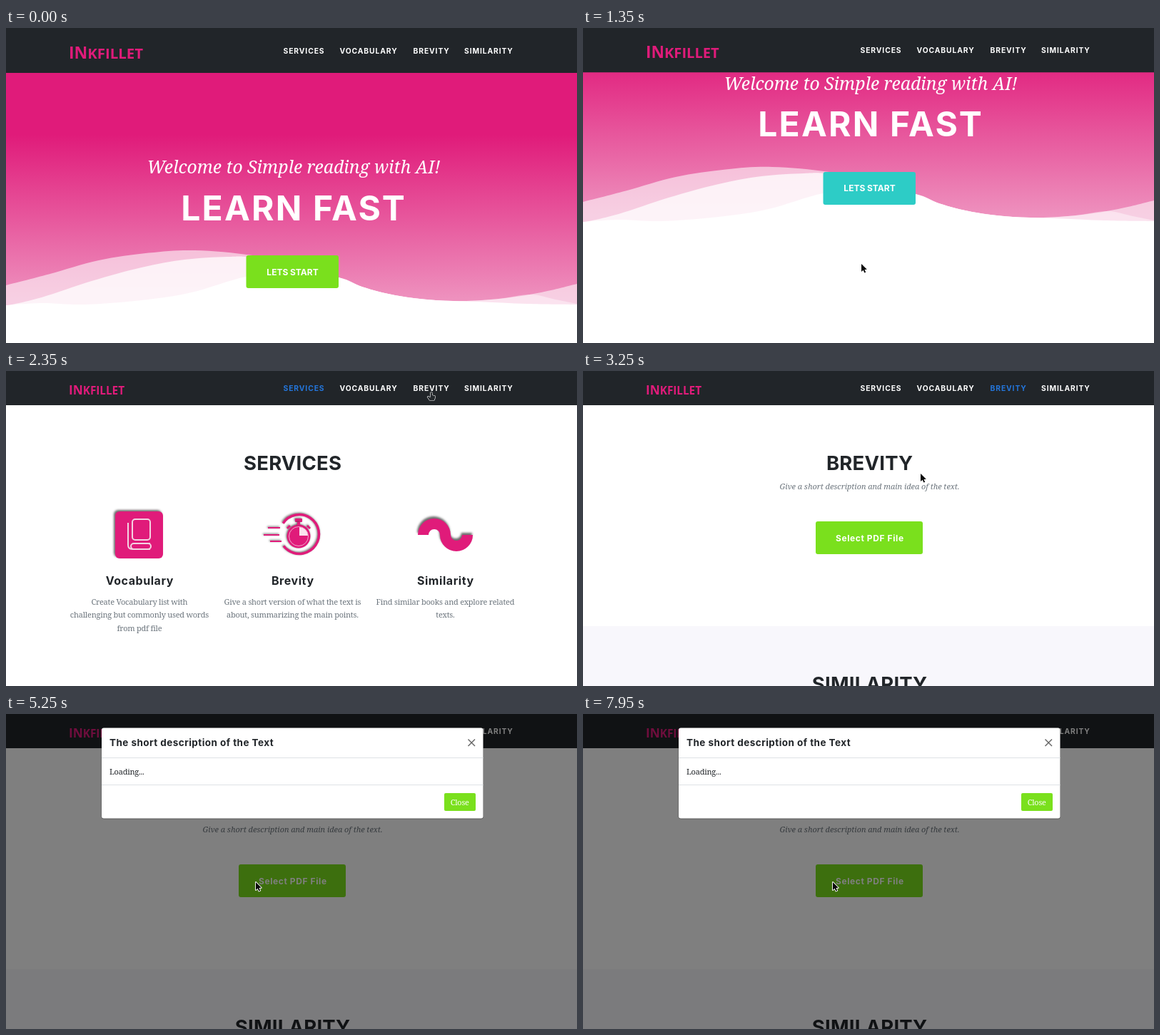
Animation of 800 by 442 pixels, one loop 8 s. Source, as an HTML page with a canvas:

```html
<!DOCTYPE html>
<html lang="en">
<head>
<meta charset="utf-8">
<title>Simple reading</title>
<style>
html, body { margin: 0; width: 100%; height: 100%; overflow: hidden; background: #fff; }
canvas { display: block; width: 100vw; height: 100vh; }
</style>
</head>
<body>
<canvas id="stage"></canvas>
<script>
const W = 800, H = 442, LOOP = 8000, STEP = 50;
const canvas = document.getElementById('stage');
const ratio = window.devicePixelRatio || 1;
canvas.width = W * ratio;
canvas.height = H * ratio;
const c = canvas.getContext('2d');

const PINK = '#e01b7a', GREEN = [122, 224, 29], CYAN = [30, 200, 232];
const DARK = '#212529', MUTED = '#6c757d', BLUE = [36, 118, 220], WHITE = [255, 255, 255];
const SANS = 'Inter, "Open Sans", sans-serif';
const SERIF = '"Noto Serif", serif';
const UI = '"Noto Sans", "Open Sans", sans-serif';

// Page layout: tops of the sections in page coordinates
const SERVICES = 518, VOCABULARY = 933, BREVITY = 1243, SIMILARITY = 1553, NAV_SMALL = 48;
const DIALOG_OPEN = 3800, DIALOG_CLOSE = 4800, MODAL_AT = 4850;

const clamp = v => Math.max(0, Math.min(1, v));
const span = (t, a, b) => clamp((t - a) / (b - a));
const lerp = (a, b, k) => a + (b - a) * k;
const easeInOut = k => k < .5 ? 2 * k * k : 1 - 2 * (1 - k) * (1 - k);
const easeOut = k => 1 - (1 - k) * (1 - k);
const mix = (a, b, k) => `rgb(${a.map((v, i) => Math.round(lerp(v, b[i], k))).join(',')})`;
// On between a and b, with a short fade at both ends
const pulse = (t, a, b, fade = 150) => span(t, a, a + fade) * (1 - span(t, b, b + fade));

function text(str, x, y, font, color, align = 'left', spacing = 0) {
  c.font = font;
  c.fillStyle = color;
  c.textAlign = align;
  c.textBaseline = 'alphabetic';
  c.letterSpacing = spacing + 'px';
  c.fillText(str, align === 'center' ? x + spacing / 2 : x, y);
}

function rect(x, y, w, h, color, r = 0) {
  c.fillStyle = color;
  c.beginPath();
  c.roundRect(x, y, w, h, r);
  c.fill();
}

function disc(x, y, r, color) {
  c.fillStyle = color;
  c.beginPath();
  c.arc(x, y, r, 0, 7);
  c.fill();
}

function line(points, color, width = 1) {
  c.strokeStyle = color;
  c.lineWidth = width;
  c.beginPath();
  points.forEach(([x, y]) => c.lineTo(x, y));
  c.stroke();
}

function shape(points, color) {
  c.fillStyle = color;
  c.beginPath();
  points.forEach(([x, y]) => c.lineTo(x, y));
  c.fill();
}

// Smooth curve through the points, filled downwards
function wave(points, bottom, color) {
  const at = i => points[Math.max(0, Math.min(points.length - 1, i))];
  c.fillStyle = color;
  c.beginPath();
  c.moveTo(...points[0]);
  for (let i = 0; i < points.length - 1; i++) {
    const [p, a, b, n] = [at(i - 1), at(i), at(i + 1), at(i + 2)];
    c.bezierCurveTo(a[0] + (b[0] - p[0]) / 6, a[1] + (b[1] - p[1]) / 6,
      b[0] - (n[0] - a[0]) / 6, b[1] - (n[1] - a[1]) / 6, b[0], b[1]);
  }
  c.lineTo(W, bottom);
  c.lineTo(0, bottom);
  c.fill();
}

const FALL = [[466, 350], [500, 363.5], [545, 375], [595, 381.5]];
const BACK_WAVE = [[0, 361], [60, 345.5], [130, 326], [200, 315.5], [265, 312], [345, 319], [420, 334],
  ...FALL, [645, 383], [700, 379], [750, 371], [800, 359]];
const MID_WAVE = [[0, 390], [50, 378], [120, 355], [190, 336], [250, 325], [310, 321], [345, 322], [420, 336],
  ...FALL, [660, 385], [800, 390]];
const TAIL_WAVE = [[600, 382], [645, 383], [690, 380], [735, 374], [770, 381], [800, 387]];
const FRONT_WAVE = [[0, 389], [50, 386], [110, 388], [190, 382], [260, 371], [336, 349], [400, 343],
  ...FALL, [660, 384], [730, 387], [800, 388]];

function hero(hover) {
  const g = c.createLinearGradient(0, 150, 0, 380);
  g.addColorStop(0, PINK);
  g.addColorStop(1, '#ee91be');
  rect(0, 0, W, 400, g);
  wave(BACK_WAVE, 401, 'rgba(255,255,255,.57)');
  wave(MID_WAVE, 401, 'rgba(255,255,255,.76)');
  wave(TAIL_WAVE, 401, 'rgba(255,255,255,.4)');
  wave(FRONT_WAVE, 401, '#fff');
  text('Welcome to Simple reading with AI!', 403, 204, `italic 24.7px ${SERIF}`, '#fff', 'center');
  text('LEARN FAST', 402, 269.5, `700 48px ${SANS}`, '#fff', 'center', 2.2);
  rect(336.5, 319, 129.5, 46, mix(GREEN, CYAN, hover), 3);
  text('LETS START', 401.5, 346.5, `700 12px ${SANS}`, '#fff', 'center');
}

function heading(str, top) {
  text(str, 401.5, top + 90.5, `700 27.5px ${SANS}`, DARK, 'center', .2);
}

function withShadow(dx, dy, draw) {
  c.save();
  c.shadowColor = 'rgba(60,60,60,.75)';
  c.shadowBlur = 3 * ratio;
  c.shadowOffsetX = dx * ratio;
  c.shadowOffsetY = dy * ratio;
  draw();
  c.restore();
}

function bookIcon(y) {
  withShadow(-2, -2, () => rect(153, y + 149, 67, 66, PINK, 6));
  c.strokeStyle = '#f3d3e2';
  c.lineWidth = 2;
  c.beginPath();
  c.roundRect(177, y + 160, 25, 29, 4);
  c.moveTo(171, y + 165);
  c.lineTo(171, y + 196);
  c.quadraticCurveTo(171, y + 202, 177, y + 202);
  c.lineTo(202, y + 202);
  c.moveTo(202, y + 194);
  c.lineTo(179, y + 194);
  c.arc(179, y + 198, 4, -Math.PI / 2, Math.PI / 2, true);
  c.lineTo(199, y + 202);
  c.arc(199, y + 198, 4, Math.PI / 2, -Math.PI / 2, true);
  c.stroke();
}

function watchIcon(y) {
  const cy = y + 182;
  withShadow(-1, -1, () => {
    c.strokeStyle = PINK;
    c.lineWidth = 3.5;
    c.beginPath();
    c.arc(411, cy - 1, 27.5, -2.55, 2.5);
    c.stroke();
    [[367, 384, -10], [361, 383, 0], [370, 386, 9]].forEach(([a, b, d]) =>
      line([[a, cy + d], [b, cy + d]], PINK, 2));
    disc(410, cy + 2, 16.5, PINK);
    rect(405, cy - 23, 10, 5, PINK, 1);
    rect(408, cy - 18, 4, 5, PINK);
    line([[422, cy - 13], [426, cy - 9]], PINK, 3);
    line([[398, cy - 13], [394, cy - 9]], PINK, 3);
  });
  c.fillStyle = '#fbe3ee';
  c.beginPath();
  c.moveTo(411, cy + 1);
  c.arc(411, cy + 1, 12, -Math.PI / 2, 0);
  c.fill();
  c.strokeStyle = '#f2a9cb';
  c.lineWidth = 1;
  c.beginPath();
  c.arc(410, cy + 2, 13.5, 0, 7);
  c.stroke();
}

function sineIcon(y) {
  withShadow(-1, -3, () => {
    c.strokeStyle = PINK;
    c.lineWidth = 15;
    c.beginPath();
    c.arc(600, y + 182, 15.5, Math.PI, 0);
    c.arc(631, y + 182, 15.5, Math.PI, 0, true);
    c.stroke();
  });
}

const CARDS = [
  [187, 'Vocabulary', ['Create Vocabulary list with', 'challenging but commonly used words', 'from pdf file']],
  [401.5, 'Brevity', ['Give a short version of what the text is', 'about, summarizing the main points.']],
  [615.5, 'Similarity', ['Find similar books and explore related', 'texts.']]
];

function services(y) {
  heading('SERVICES', y);
  bookIcon(y);
  watchIcon(y);
  sineIcon(y);
  for (const [x, title, rows] of CARDS) {
    text(title, x, y + 251.5, `700 16px ${SANS}`, DARK, 'center', .55);
    rows.forEach((row, i) =>
      text(row, x, y + 279.5 + i * 18.8, `11px ${SERIF}`, MUTED, 'center', -.25));
  }
}

function uploader(y, title, note, hover = 0) {
  heading(title, y);
  text(note, 401.5, y + 118, `italic 10.9px ${SERIF}`, MUTED, 'center');
  rect(326, y + 163, 150, 46, mix(GREEN, CYAN, hover), 3);
  text('Select PDF File', 401.5, y + 190.5, `700 12px ${SANS}`, '#fff', 'center', .6);
}

const LINKS = [['SERVICES', 388.5, SERVICES], ['VOCABULARY', 467.5, VOCABULARY],
  ['BREVITY', 570.5, BREVITY], ['SIMILARITY', 642, SIMILARITY]];

function navbar(shrink, scroll, brevityHover) {
  const h = lerp(63, NAV_SMALL, shrink);
  const size = lerp(1, .75, shrink);
  rect(0, 0, W, h, DARK);
  c.save();
  c.translate(88, lerp(42.5, 33, shrink));
  c.scale(size, size);
  text('IN', 0, 0, `700 23px "Open Sans", ${UI}`, PINK);
  text('KFILLET', 26.3, 0, `700 20.4px "Open Sans", ${UI}`, PINK);
  c.restore();
  LINKS.forEach(([label, x, top], i) => {
    const next = i < 3 ? LINKS[i + 1][2] : Infinity;
    const spy = scroll + 110;
    const active = spy >= top && spy < next;
    const k = active ? 1 : label === 'BREVITY' ? brevityHover : 0;
    text(label, x, h / 2 + 4, `700 10.3px ${SANS}`, mix(WHITE, BLUE, k), 'left', .9);
  });
}

function scrollAt(t) {
  const first = SERVICES - NAV_SMALL, second = BREVITY - NAV_SMALL;
  return t < 2620
    ? first * easeInOut(span(t, 1170, 1680))
    : lerp(first, second, easeInOut(span(t, 2630, 3150)));
}

function page(t) {
  const scroll = scrollAt(t);
  rect(0, 0, W, H, '#fff');
  c.save();
  c.translate(0, -scroll);
  hero(pulse(t, 720, 1325));
  services(SERVICES);
  rect(0, VOCABULARY, W, BREVITY - VOCABULARY, '#f8f7fc');
  uploader(VOCABULARY, 'VOCABULARY', 'Create a list of challenging but commonly used words.');
  uploader(BREVITY, 'BREVITY', 'Give a short description and main idea of the text.', pulse(t, 3460, 4000));
  rect(0, SIMILARITY, W, 310, '#f8f7fc');
  heading('SIMILARITY', SIMILARITY);
  c.restore();
  const k = span(t, 1310, 1610);
  navbar(k * k * (3 - 2 * k), scroll, pulse(t, 2350, 2950));
}

function modal(t) {
  const fade = span(t, MODAL_AT, MODAL_AT + 150);
  rect(0, 0, W, H, `rgba(0,0,0,${.5 * fade})`);
  c.save();
  c.globalAlpha = fade;
  c.translate(0, -33 * (1 - easeOut(span(t, MODAL_AT, MODAL_AT + 300))));
  rect(133.5, 19, 535.5, 128.5, 'rgba(0,0,0,.3)', 4);
  rect(134, 19.5, 534.5, 127, '#fff', 3);
  rect(134, 61, 534.5, 1, '#dee2e6');
  rect(134, 99, 534.5, 1, '#dee2e6');
  text('The short description of the Text', 145, 45, `700 13.5px ${SANS}`, DARK, 'left', .45);
  line([[647.5, 35.5], [657, 45]], '#666', 1.4);
  line([[657, 35.5], [647.5, 45]], '#666', 1.4);
  text('Loading...', 145, 85, `11px ${SERIF}`, DARK, 'left', -.25);
  rect(614, 111, 44, 25, `rgb(${GREEN})`, 2);
  text('Close', 635.8, 128, `10.8px ${SERIF}`, '#fff', 'center', -.2);
  c.restore();
}

function folder(x, y, color) {
  rect(x, y - 4, 5, 3, color, 1);
  rect(x, y - 3, 10, 7, color, 1);
}

function sheet(x, y) {
  rect(x, y - 5, 8, 10, '#eef0f4', 1);
  [-2, 0, 2].forEach(d => rect(x + 2, y + d, 4, .8, '#8b93a5'));
}

const PLACES = [['Recent', 37], ['Home', 58.5], ['Desktop', 80], ['Downloads', 101.5],
  ['git', 129], ['data', 150.5], ['Other Locations', 178]];
const FILES = [['venv', '', '', 'Tue'], ['app', '', '', '09:15'],
  ['README.md', '60 bytes', 'Text', 'Tue'], ['example.pdf', '377.4 kB', 'Document', 'Tue']];

function placeIcons(ink) {
  c.strokeStyle = ink;
  c.lineWidth = 1.3;
  c.beginPath();
  c.arc(8, 37.5, 4.3, 0, 7);
  c.stroke();
  line([[8, 38], [10, 36]], ink, 1.2);
  house(8, 58.5, ink);
  rect(3, 76, 10, 6, ink);
  rect(3, 83, 2, 2, ink);
  rect(11, 83, 2, 2, ink);
  rect(7, 96, 2, 5, ink);
  shape([[4, 100], [12, 100], [8, 104]], ink);
  rect(4, 105, 8, 1.4, ink);
  folder(3, 129.5, ink);
  folder(3, 151, ink);
  rect(3, 177.4, 10, 1.3, ink);
  rect(7.4, 173, 1.3, 10, ink);
}

function house(x, y, ink) {
  shape([[x - 5, y], [x, y - 5], [x + 5, y]], ink);
  rect(x - 3.5, y - 1, 2.5, 5, ink);
  rect(x + 1, y - 1, 2.5, 5, ink);
}

function dialog(t) {
  const font = `9.4px ${UI}`, bold = `700 9.3px ${UI}`, ink = '#e4e6eb';
  rect(0, 0, W, H, '#23252e');
  rect(0, 0, W, 25, '#20222b');
  rect(0, 0, W, 4, '#191b22');
  rect(0, 25, 20.5, H, '#191b20');
  disc(2, 15, 5.5, '#2777ff');
  line([[0, 13], [4, 17]], '#101624', 1.2);
  line([[4, 13], [0, 17]], '#101624', 1.2);
  disc(17, 15, 5.5, '#0e1015');
  disc(17, 15, 4.5, '#343742');
  text('File Upload', 411, 17.5, `700 7.6px ${UI}`, '#fff', 'center');
  PLACES.forEach(([name, y]) => text(name, 27, y + 3.5, font, ink));
  placeIcons('#c9ccd3');

  rect(114, 25, 1, H, '#17191f');
  rect(115, 25, 685, 28, '#272a34');
  rect(119, 29, 160.5, 19.5, '#15171d', 3);
  rect(120, 30, 158.5, 17.5, '#30333e', 2);
  rect(203, 30, 58, 17.5, '#1d1f27');
  [137, 174, 202, 261].forEach(x => rect(x, 30, 1, 17.5, '#15171d'));
  shape([[130, 35.5], [130, 42], [126, 38.8]], ink);
  shape([[269, 35.5], [269, 42], [273, 38.8]], '#8b8f99');
  house(148, 39, ink);
  text('ko', 156, 42, font, ink);
  text('git', 183, 42, font, ink);
  text('easylearn', 211, 42, font, ink);

  rect(115, 53, 685, 17, '#2e313c');
  rect(115, 53, 685, 1, '#191b22');
  rect(115, 69.5, 685, 1, '#191b22');
  [634, 682.5, 738].forEach(x => rect(x, 53, 1, 17, '#191b22'));
  [['Name', 119], ['Size', 638], ['Type', 687], ['Modified', 742]].forEach(([name, x]) =>
    text(name, x, 65, bold, '#fff'));
  shape([[786, 60], [793, 60], [789.5, 63.8]], ink);

  if (t >= 4350) rect(115, 120.5, 685, 17, '#2476ff');
  FILES.forEach(([name, size, type, date], i) => {
    const y = 78.7 + i * 16.9;
    if (i < 2) folder(121, y, '#2777ff'); else sheet(122, y - .5);
    text(name, 137, y + 3.4, font, ink);
    text(size, 677, y + 3.4, font, ink, 'right');
    text(type, 688, y + 3.4, font, ink);
    text(date, 744, y + 3.4, font, ink);
  });
}

// Pointer stops: time, x, y
const PATH = [[350, 806, 300], [800, 390, 331], [1720, 390, 331], [2330, 595, 30], [2800, 595, 30],
  [3150, 473, 144], [3250, 473, 144], [3520, 420, 237], [3860, 420, 237], [4200, 193, 131],
  [4800, 193, 131], [5130, 350, 236], [LOOP, 350, 236]];

function pointerAt(t) {
  const i = PATH.findIndex(p => p[0] > t);
  const [a, b] = [PATH[i - 1], PATH[i]];
  const k = easeInOut(span(t, a[0], b[0]));
  return [lerp(a[1], b[1], k), lerp(a[2], b[2], k)];
}

const ARROW = [[0, 0], [0, 11], [2.6, 8.7], [4.4, 12.5], [6.2, 11.7], [4.5, 8], [7.8, 7.8]];
const HAND = [[0, 0], [1.8, 0], [2, 4], [6, 5], [6, 8], [4.8, 11], [-1.5, 11], [-4.5, 6.5], [-3.5, 5.5], [-.6, 7.2]];

function pointer(t) {
  if (t < PATH[0][0]) return;
  const [x, y] = pointerAt(t);
  const hand = (t > 720 && t < 1300) || (t > 2290 && t < 2850) || (t > 3460 && t < DIALOG_OPEN);
  c.save();
  c.translate(x, y);
  c.beginPath();
  (hand ? HAND : ARROW).forEach(p => c.lineTo(...p));
  c.closePath();
  c.lineJoin = 'round';
  c.lineWidth = hand ? 1.2 : 1.8;
  c.strokeStyle = '#fff';
  c.stroke();
  c.fillStyle = hand ? '#25292d' : '#0b0b0b';
  c.fill();
  c.restore();
}

function frame() {
  const t = Math.floor(performance.now() % LOOP / STEP) * STEP;
  c.setTransform(ratio, 0, 0, ratio, 0, 0);
  if (t >= DIALOG_OPEN && t < DIALOG_CLOSE) dialog(t);
  else page(t);
  if (t >= MODAL_AT) modal(t);
  pointer(t);
  requestAnimationFrame(frame);
}
frame();
</script>
</body>
</html>
```
